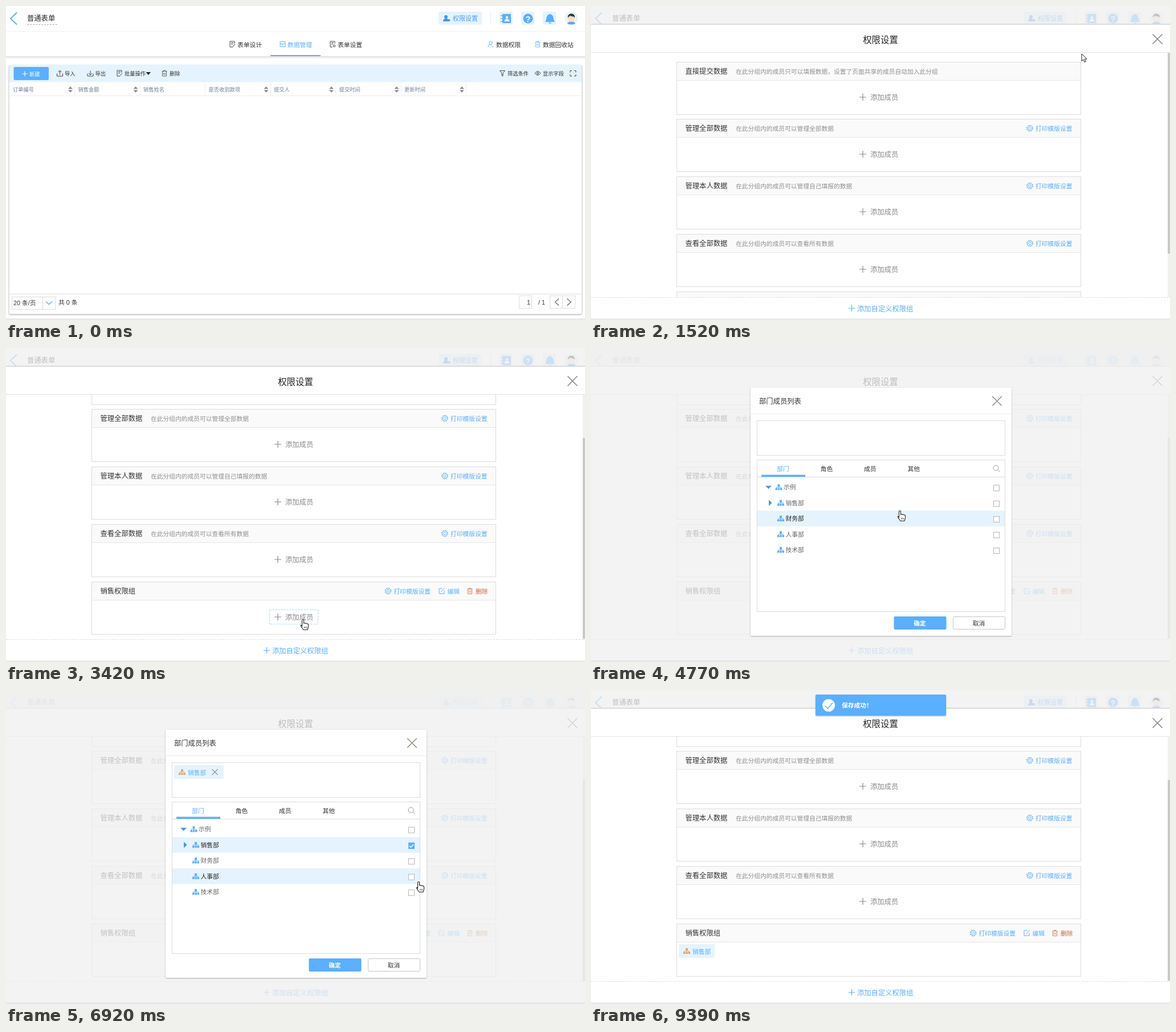
Write an HTML page that moves like this. It is 1016 px wide and 551 px high and loops after 9.95 s.

```html
<!DOCTYPE html>
<html>
<head>
<meta charset="utf-8">
<style>
html, body { margin: 0; width: 100%; height: 100%; overflow: hidden; background: #fff; }
svg { display: block; }
text { font-family: "Liberation Sans", "Noto Sans CJK SC", "Noto Sans CJK", sans-serif; white-space: pre; }
</style>
</head>
<body>
<svg id="stage" width="1016" height="551" viewBox="0 0 1016 551"></svg>
<script>
const LOOP = 9950;
const BLUE = '#5aaffe', PALE = '#e5f3fe', INK = '#333', GREY = '#888', LINE = '#dcdcdc', RUST = '#c7653c';
const SIZE = { xs: 9.25, s: 10.75, m: 12.3, l: 15.4 };
const SCROLL = 90.75, GROUP_STEP = 100.75, ROW_TOP = 230.5, ROW = 27.5;

// Markup helpers. Text is placed by its vertical centre.
const text = (x, y, s, size = SIZE.s, fill = INK, extra = '') =>
  `<text x="${x}" y="${y + size * 0.38}" font-size="${size}" fill="${fill}" ${extra}>${s}</text>`;
const centred = (x, y, s, size, fill, extra = '') => text(x, y, s, size, fill, 'text-anchor="middle" ' + extra);
const rect = (x, y, w, h, fill, stroke = 'none', rx = 0, extra = '') =>
  `<rect x="${x}" y="${y}" width="${w}" height="${h}" fill="${fill}" stroke="${stroke}" rx="${rx}" ${extra}/>`;
const line = (d, stroke = LINE, width = 1, extra = '') =>
  `<path d="${d}" fill="none" stroke="${stroke}" stroke-width="${width}" ${extra}/>`;
const solid = (d, fill) => `<path d="${d}" fill="${fill}"/>`;
const circle = (x, y, r, fill, stroke = 'none', extra = '') =>
  `<circle cx="${x}" cy="${y}" r="${r}" fill="${fill}" stroke="${stroke}" ${extra}/>`;
const at = (x, y, body) => `<g transform="translate(${x} ${y})">${body}</g>`;
const cross = (x, y, r, stroke, w = 1.3) => line(`M${x - r} ${y - r}l${2 * r} ${2 * r}M${x + r} ${y - r}l${-2 * r} ${2 * r}`, stroke, w);
const plus = (x, y, r, stroke, w = 1.2) => line(`M${x - r} ${y}h${2 * r}M${x} ${y - r}v${2 * r}`, stroke, w);

// Icons, each drawn around its own centre.
const icon = {
  form: (x, y, c) => at(x, y, line('M4-1v-4h-8v10h5M-2-2.5h4M-2 0h3M1 4.5l4-4.5', c)),
  chart: (x, y, c) => at(x, y, line('M-4.5-4.5h9v9h-9zM-4 1l2-3 2 4 2-4 2 2', c, 0.9)),
  gearForm: (x, y, c) => at(x, y, line('M4-1v-4h-8v10h4M-2-2.5h4M-2 0h3', c) + circle(3, 3, 1.8, 'none', c)),
  trash: (x, y, c) => at(x, y, line('M-4.5-3.5h9M-1.5-3.5v-1.5h3v1.5M-3.5-3.5v8.5h7v-8.5M-1.2-1v4M1.2-1v4', c, 0.8)),
  person: (x, y, c) => at(x, y, circle(0, -2, 2.6, 'none', c) + line('M-4.5 5c0-5 5-5 6-3M2 3l3 2', c)),
  tray: (x, y, c, up) => at(x, y, line('M-5 0v4.5h10v-4.5M0-5v7' + (up ? 'M-3-2.5l3-3 3 3' : 'M-3-.5l3 3 3-3'), c)),
  eye: (x, y, c) => at(x, y, line('M-5 0q5-7 10 0q-5 7-10 0z', c) + circle(0, 0, 1.6, 'none', c)),
  gear: (x, y, c) => at(x, y, circle(0, 0, 2.2, 'none', c, 'stroke-width=".9"') +
    circle(0, 0, 4.6, 'none', c, 'stroke-width=".9"') + circle(0, 0, 5.4, 'none', c, 'stroke-dasharray="2.1 2.14"')),
  edit: (x, y, c) => at(x, y, line('M1-4.5h-5.5v9h9v-5M-1 1.5l6-6.5', c)),
  org: (x, y, c) => at(x, y, solid('M-2-5h4v4h-4zM-6 1.5h3.5v3.5h-3.5zM-1.75 1.5h3.5v3.5h-3.5zM2.5 1.5h3.5v3.5h-3.5z', c) + line('M-4.2 2v-2h8.4v2M0-1v3', c, 0.9)),
  sort: (x, y) => at(x, y, solid('M-4-1l4-4.2 4 4.2zM-4 1l4 4.2 4-4.2z', '#888'))
};

function pageMarkup() {
  const heads = ['订单编号', '销售金额', '销售姓名', '是否收到款项', '提交人', '提交时间', '更新时间'];
  const table = heads.map((name, i) => {
    const x = 6 + i * 114.5;
    return text(x + 6, 146, name, SIZE.xs, '#71809a') + (i === 2 ? '' : icon.sort(x + 107, 146.5)) +
      line(`M${Math.round(x + 114) + 0.5} 134v23`, '#eee');
  }).join('');
  return rect(0, 0, 1016, 551, '#fff') +
    line('M19 11.5L8 22l11 10.5', BLUE, 2) + text(37, 21.5, '普通表单', SIZE.m, '#222') +
    line('M37 32.5h54', '#aaa', 1, 'stroke-dasharray="3 2"') +
    rect(759, 10, 76, 23, PALE, 'none', 3) +
    at(773, 21.5, circle(-1, -2.5, 3, '#4697e8') + solid('M-6 5.5c0-7 10-7 10 0z', '#4697e8') + circle(4.5, 3.5, 2, '#4697e8')) +
    text(784, 22, '权限设置', 11, '#4a9ff0') + line('M850.5 10v23', '#d3e9fb') +
    [866, 904, 942].map(x => rect(x, 10, 23, 23, PALE, 'none', 2)).join('') +
    rect(871, 14, 15, 16, BLUE) + line('M868 17h5M868 22h5M868 27h5', BLUE, 1.6) +
    circle(879, 20, 2.2, '#fff') + solid('M874.5 27c0-6 9-6 9 0z', '#fff') +
    circle(916, 22, 8.5, BLUE) + centred(916, 22.2, '?', 14, '#fff', 'font-weight="bold"') +
    solid('M946 28c3-3 1-13 8.5-14c7.5 1 5.5 11 8.5 14zM951.5 29h6q-3 3.5-6 0z', BLUE) +
    circle(992, 21.5, 11.5, PALE) + solid('M985 31c1-5 13-5 14 0q-7 3-14 0z', '#57a9f2') +
    `<ellipse cx="992" cy="22" rx="5.5" ry="6" fill="#fddcc4"/>` +
    solid('M986 21c-2-10 14-10 12 0l-1.5-2.5q-5 0-6-2q-1 2-3 2z', '#333') +
    line('M0 44.5h1016', '#f0f0f0') +
    icon.form(397, 67, '#444') + text(406, 67.5, '表单设计') +
    icon.chart(485.5, 67, BLUE) + text(494, 67.5, '数据管理', SIZE.s, BLUE) +
    icon.gearForm(573, 67, '#444') + text(582, 67.5, '表单设置') +
    icon.person(850.5, 67, BLUE) + text(860, 67.5, '数据权限') +
    icon.trash(933, 67, BLUE) + text(942, 67.5, '数据回收站') +
    rect(0, 88, 1016, 5, 'url(#shade)') + rect(464, 86, 88, 2, BLUE) +
    rect(5.5, 103.5, 1005, 437, '#fff', '#ddd', 2, 'filter="url(#soft)"') +
    rect(6, 103, 1004, 30.5, PALE) + rect(13.5, 107, 61.5, 23, BLUE, 'none', 2) +
    plus(33, 119, 4.5, '#fff') + text(41, 119, '新建', SIZE.xs, '#fff') +
    icon.tray(94.5, 118.5, '#444', true) + text(103, 118.5, '导入', SIZE.xs) +
    icon.tray(148, 118.5, '#444') + text(156.5, 118.5, '导出', SIZE.xs) +
    icon.form(199, 118, '#444') + text(208, 118.5, '批量操作', SIZE.xs) + solid('M245.5 116h8.5l-4.25 5z', '#222') +
    icon.trash(278, 118, '#444') + text(287, 118.5, '删除', SIZE.xs) +
    line('M866.5 113.5h9l-3.5 4.5v5l-2-1v-4z', '#444') + text(880, 118.5, '筛选条件', SIZE.xs) +
    icon.eye(933, 118, '#444') + text(942, 118.5, '显示字段', SIZE.xs) +
    line('M990 116.5v-3h3M997 113.5h3v3M1000 120v3h-3M993 123h-3v-3', '#444') +
    table + line('M6 157.5h1004', '#eee') + line('M6 505.5h1004', '#ddd') +
    rect(10.5, 510.5, 76, 22, '#fff', LINE) + line('M64.5 511v22') + line('M70 518.5l5.5 5 5.5-5', BLUE, 1.3) +
    text(13, 521, '20 条/页', SIZE.s) + text(92, 520, '共 0 条', SIZE.s) +
    rect(900.5, 508.5, 22, 22, '#fff', LINE) + text(914, 520, '1') + text(934, 520, '/ 1') +
    rect(954.5, 508.5, 44, 22, '#fff', LINE) + line('M976.5 509v22') +
    line('M970 513.5l-6.5 6 6.5 6M984.5 513.5l7 6-7 6', '#666', 1.2) +
    line('M0 549.5h1016', '#ccc');
}

const shroud = rect(0, 0, 1016, 549, '#efefef', 'none', 0, 'opacity=".76"');
const link = (x, y, draw, label, color = BLUE) => draw(x, y, color) + text(x + 10, y + 0.5, label, SIZE.s, color);
const addMember = (y, border = '') => border + plus(477, y, 6, GREY) + text(490, y + 0.5, '添加成员', SIZE.m, GREY);

function groupMarkup(title, note, i) {
  const y = 98 + Math.floor(i * GROUP_STEP), mid = y + 16.5, last = i === 4;
  return rect(150.5, y + 0.5, 709, 92, '#fff', LINE) + rect(151, y + 1, 708, 31, '#fafafa') +
    line(`M151 ${y + 32.5}h708`, '#e6e6e6') + text(165.5, mid, title, SIZE.m, INK) + text(254, mid, note, SIZE.s, '#909090') +
    (i ? link(last ? 670.5 : 770, mid, icon.gear, '打印模版设置') : '') +
    (last ? link(764.5, mid, icon.edit, '编辑') + link(814, mid, icon.trash, '删除', RUST) +
      `<g id="empty">${addMember(y + 62, rect(462.5, y + 49.5, 85, 25, 'none', '#a9d6f7', 0, 'id="hover" stroke-dasharray="3 2"'))}</g>` +
      `<g id="member">${rect(154, y + 36, 63, 24, PALE, 'none', 3)}${icon.org(168, y + 48, '#e5a765')}${text(178, y + 48.5, '销售部', SIZE.s, BLUE)}</g>`
      : addMember(y + 62));
}

function panelMarkup() {
  const groups = [
    ['直接提交数据', '在此分组内的成员只可以填报数据，设置了页面共享的成员自动加入此分组'],
    ['管理全部数据', '在此分组内的成员可以管理全部数据'],
    ['管理本人数据', '在此分组内的成员可以管理自己填报的数据'],
    ['查看全部数据', '在此分组内的成员可以查看所有数据'],
    ['销售权限组', '']
  ];
  return shroud + rect(0, 32, 1016, 517, '#fff') + line('M0 32h1016', '#d2d2d2', 1.6) +
    centred(508, 59, '权限设置', SIZE.l, '#222') + cross(994, 58, 8.5, '#8c8080', 1.5) + line('M0 81.5h1016', '#e2e2e2') +
    `<svg x="0" y="82" width="1016" height="429" viewBox="0 82 1016 429"><g id="list">${groups.map((g, i) => groupMarkup(...g, i)).join('')}</g></svg>` +
    rect(1012, 82, 4, 429, '#f1f1f1') + rect(1012, 82, 4, 353, '#c9c9c9', 'none', 2, 'id="thumb"') +
    line('M0 511.5h1016', '#dcdcdc', 1, 'stroke-dasharray="3 2"') +
    plus(457.5, 530.5, 5.5, BLUE) + text(467, 531, '添加自定义权限组', SIZE.m, BLUE) + line('M0 549.5h1016', '#ccc');
}

function dialogMarkup() {
  const rows = ['示例', '销售部', '财务部', '人事部', '技术部'].map((name, i) => {
    const y = ROW_TOP + ROW * (i + 0.5), x = i ? 333 : 329.5;
    return rect(292, y - ROW / 2, 434, ROW, PALE, 'none', 0, `id="row${i}"`) +
      (i === 0 ? solid(`M306 ${y - 2.5}h11l-5.5 5.5z`, '#4697e8') : i === 1 ? solid(`M312 ${y - 5.5}v11l5.5-5.5z`, '#4697e8') : '') +
      icon.org(x, y, BLUE) + text(x + 8.5, y, name, SIZE.s, '#666', `id="name${i}"`) +
      rect(706.5, y - 3.5, 10, 10, '#fff', '#b5b5b5');
  }).join('');
  return shroud + rect(280, 70, 458, 435, '#fff', 'none', 1, 'filter="url(#soft)"') +
    text(295, 93.5, '部门成员列表', SIZE.m, INK) + cross(712.5, 93, 8.3, '#8c8c85', 1.4) + line('M280 115.5h458', '#ececec') +
    rect(291.5, 127.5, 435, 61, '#fff', LINE) + rect(291.5, 196.5, 435, 266, '#fff', LINE) + line('M292 226.5h434') +
    ['部门', '角色', '成员', '其他'].map((s, i) => centred(337 + i * 76.4, 211.5, s, SIZE.s, i ? INK : BLUE)).join('') +
    rect(299, 222.5, 77, 3.5, BLUE) + circle(710.5, 210.5, 4.5, 'none', '#999') + line('M714 214l3.5 3.5', '#999') + rows +
    `<g id="picked">${rect(706, ROW_TOP + ROW * 1.5 - 4, 11, 11, BLUE)}${line('M708 273.5l2.5 2.5 4.5-5', '#fff', 1.4)}
      ${rect(295, 132, 87, 24, PALE, 'none', 3)}${icon.org(309, 144, '#d9ab7d')}${text(319, 144.5, '销售部', SIZE.s, BLUE)}${cross(366.5, 144, 5, '#999')}</g>` +
    rect(531.5, 471, 92, 23, BLUE, 'none', 2) + centred(577, 483, '确定', SIZE.s, '#fff', 'font-weight="bold"') +
    rect(635.5, 471.5, 91, 22, '#fff', '#c4c4c4', 2) + centred(680.5, 483, '取消', SIZE.s, INK);
}

const toastMarkup = rect(394, 8, 229, 37, BLUE, 'none', 2, 'filter="url(#soft)"') + circle(417, 27, 11, '#fff') +
  line('M410.5 27.5l5 5 8.5-10', BLUE, 1.4) + text(440, 27, '保存成功！', SIZE.s, '#fff', 'font-weight="bold"');

const arrowMarkup = `<path d="M0 0v12.5l3-2.7 2 4.7 2.2-1-2-4.5h4z" fill="#fff" stroke="#222"/>`;
const handMarkup = `<path d="M-1.5 10v-10.5q1.5-2 3 0v5.5l1.5-.5 1.5 .8 1.7-.3 1.3 1 1.2 0 .8 1.5v4l-1.5 5h-7l-4.5-6.5q-.5-2 1-1.5z" fill="#fff" stroke="#222" stroke-width="1.1"/>` +
  line('M2.5 11v3M4.5 11v3M6.5 11v3', '#222', 0.7);

const layer = (id, body) => `<g id="${id}">${body}</g>`;
document.getElementById('stage').innerHTML =
  `<defs><linearGradient id="shade" x2="0" y2="1"><stop stop-color="#dedede"/><stop offset="1" stop-color="#fff"/></linearGradient>
   <filter id="soft" x="-5%" y="-10%" width="110%" height="125%"><feDropShadow dx="0" dy="1" stdDeviation="1.3" flood-color="#000" flood-opacity=".3"/></filter></defs>` +
  pageMarkup() + layer('panel', panelMarkup()) + layer('dialog', dialogMarkup()) + layer('toast', toastMarkup) +
  layer('cursor', layer('arrow', arrowMarkup) + layer('hand', handMarkup));

const $ = id => document.getElementById(id);
const ramp = (t, a, b) => Math.min(1, Math.max(0, (t - a) / (b - a)));
const smooth = u => u * u * (3 - 2 * u);
const show = (id, on) => $(id).setAttribute('visibility', on ? 'inherit' : 'hidden');
const fade = (id, v) => { $(id).setAttribute('opacity', v); show(id, v > 0); };

// Pointer stops: time, x, y.
const stops = [
  [150, 620, 330], [1110, 800, 24], [1190, 800, 24], [1520, 861, 84], [1990, 700, 330], [3020, 700, 330],
  [3420, 521, 478], [4530, 521, 478], [4770, 542, 287], [5490, 711, 273], [6290, 711, 273], [6920, 724, 338],
  [7240, 578, 484], [7640, 578, 484], [8040, 570, 487], [8430, 570, 487], [9390, 560, 562]
];
const handTimes = [[960, 1300], [3340, 3640], [4600, 7400]];

function pointer(t) {
  const i = stops.findIndex(s => s[0] > t);
  if (i < 0) return stops.at(-1).slice(1);
  const a = stops[Math.max(0, i - 1)], b = stops[i], u = smooth(ramp(t, a[0], b[0]));
  return [a[1] + (b[1] - a[1]) * u, a[2] + (b[2] - a[2]) * u];
}

function render(t) {
  const [x, y] = pointer(t);
  const picked = t >= 5650, saved = t >= 7320;
  const scroll = smooth(ramp(t, 2150, 2540));
  const hand = handTimes.some(([a, b]) => t >= a && t < b);

  fade('panel', ramp(t, 1190, 1510));
  $('list').setAttribute('transform', `translate(0 ${-Math.round(scroll * SCROLL)})`);
  $('thumb').setAttribute('y', 82 + 75.5 * scroll);
  show('hover', t >= 3340 && t < 3700);
  show('empty', !saved);
  show('member', saved);

  fade('dialog', ramp(t, 3580, 3970) - ramp(t, 7320, 7640));
  const hovered = t > 4530 && t < 7320 ? Math.floor((y - ROW_TOP) / ROW) : -1;
  for (let i = 0; i < 5; i++) {
    const lit = i === hovered || (picked && i === 1);
    show('row' + i, lit);
    $('name' + i).setAttribute('fill', lit ? '#222' : '#666');
  }
  show('picked', picked);

  fade('toast', ramp(t, 7920, 8280));
  show('cursor', t >= 150 && t < 9390);
  $('cursor').setAttribute('transform', `translate(${x} ${y})`);
  show('arrow', !hand);
  show('hand', hand);
}

function frame() {
  render(performance.now() % LOOP);
  requestAnimationFrame(frame);
}
frame();
</script>
</body>
</html>
```
